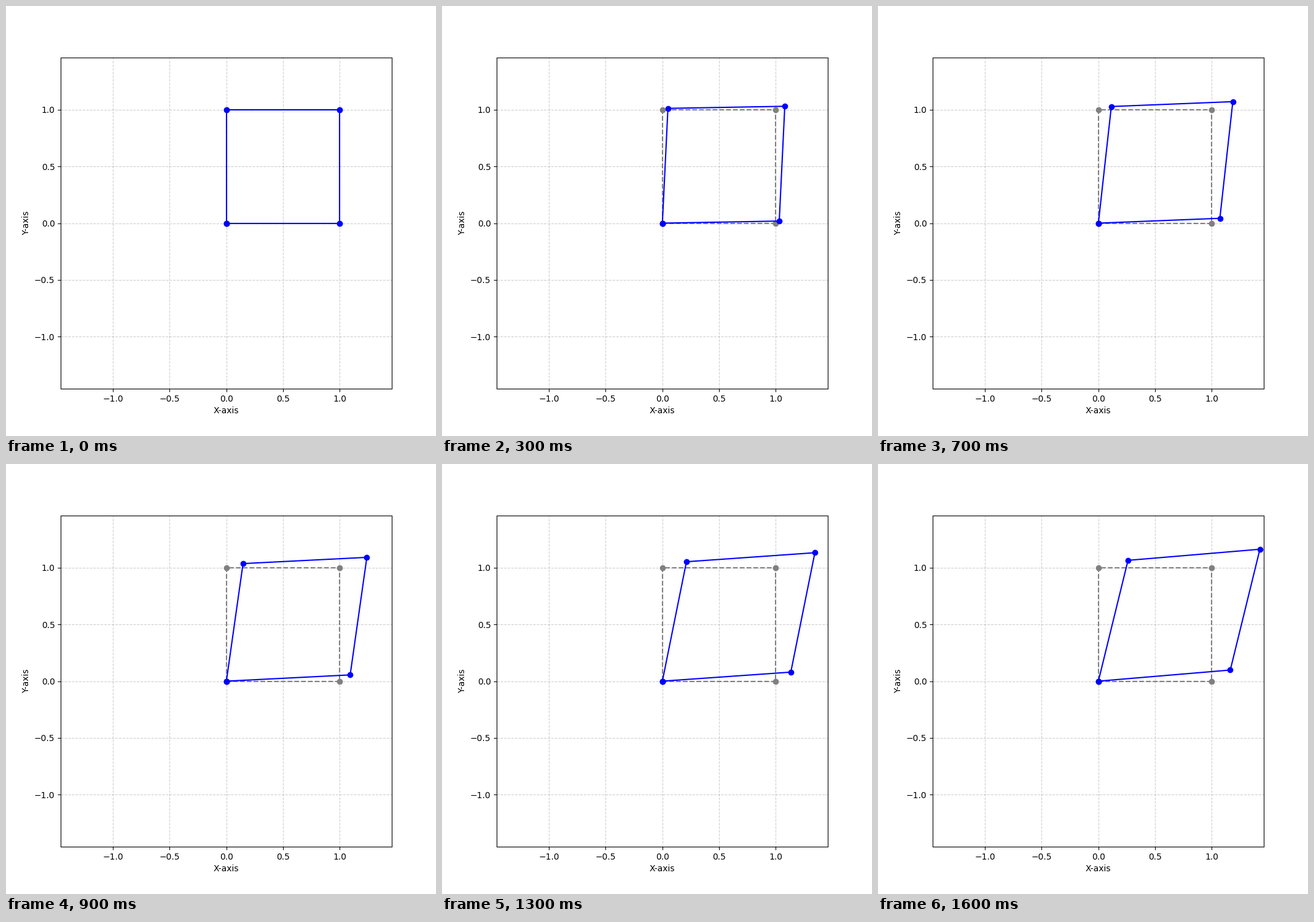
A matplotlib script for the animation above (1700 ms loop, 700 by 700 pixels).

```python
import numpy as np
import matplotlib.pyplot as plt
from matplotlib.animation import FuncAnimation

FRAMES = 17
INTERVAL = 100
STEPS = 49   # steps to reach the full deformation
LIMIT = 1.46

# Closed unit square, one vertex per column
SQUARE = np.array([[0, 1, 1, 0, 0],
                   [0, 0, 1, 1, 0]], dtype=float)
GRADIENT = np.array([[0.5, 0.8],
                     [0.3, 0.2]])

fig, ax = plt.subplots(figsize=(7, 7), dpi=100)
ax.set_xlim(-LIMIT, LIMIT)
ax.set_ylim(-LIMIT, LIMIT)
ax.set_aspect("equal")
ax.grid(True, linestyle="--", alpha=0.6)
ax.set_xlabel("X-axis")
ax.set_ylabel("Y-axis")

ax.plot(*SQUARE, "o--", color="gray")
deformed, = ax.plot(*SQUARE, "o-", color="blue")


def update(frame):
    transform = np.eye(2) + frame / STEPS * GRADIENT
    deformed.set_data(*(transform @ SQUARE))
    return deformed,


anim = FuncAnimation(fig, update, frames=FRAMES, interval=INTERVAL,
                     repeat=True, repeat_delay=0)
plt.show()
```
